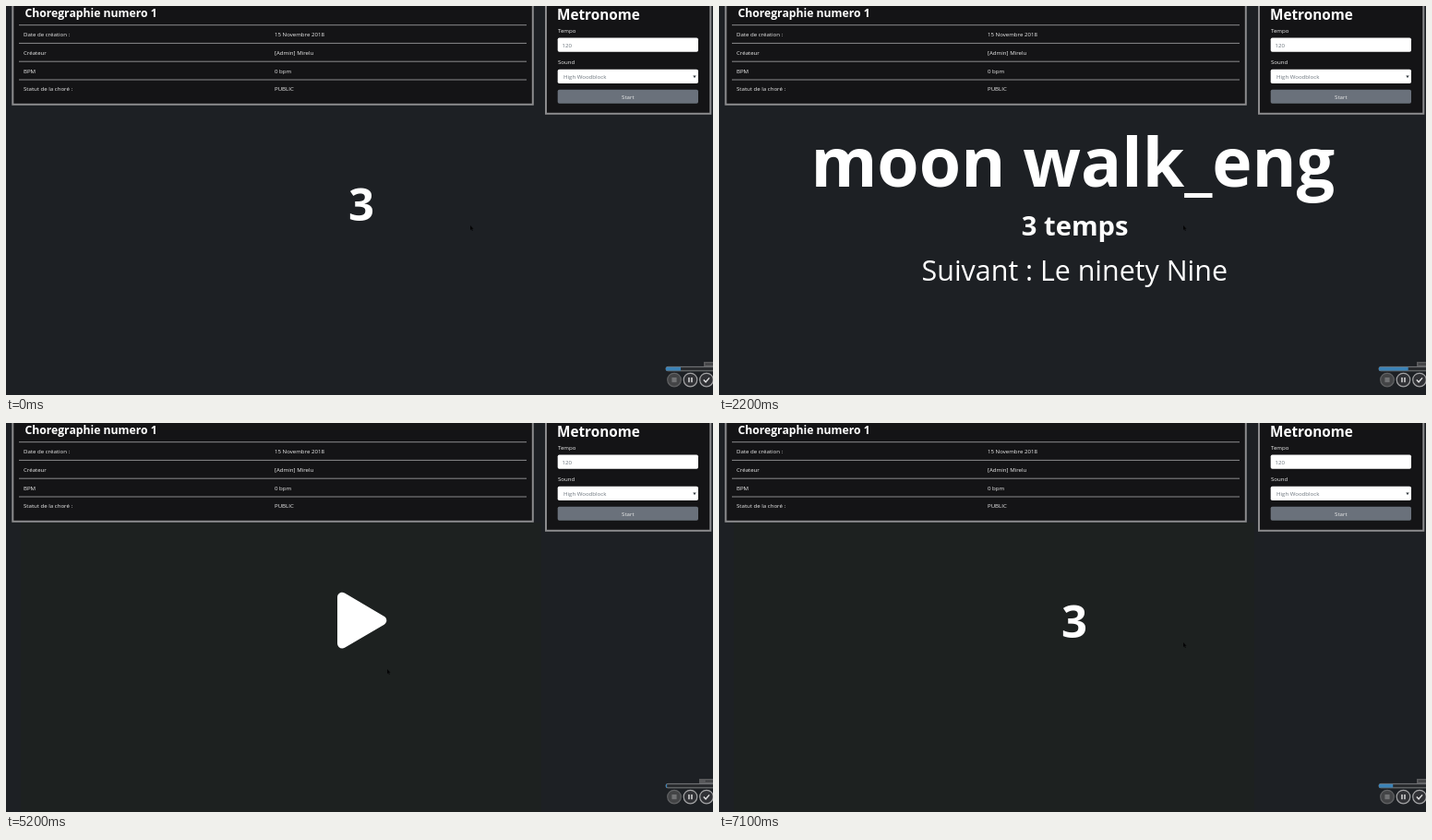
Write an HTML page that moves like this. It is 766 px wide and 422 px high and loops after 7200 ms.

```html
<!DOCTYPE html>
<html lang="fr">
<head>
<meta charset="utf-8">
<title>Choregraphie</title>
<style>
  html, body { margin: 0; width: 100%; height: 100%; overflow: hidden; background: #1d2024; }
  svg { display: block; width: 100vw; height: 100vh; }
  text { font-family: "Open Sans", "Noto Sans", sans-serif; fill: #fff; }
  .small { font-size: 6.1px; }
  .small text { fill: #eee; }
  .small .field { fill: #6c757d; }
  .bold { font-weight: 700; }
  .mid { text-anchor: middle; }
  .count { font-size: 49px; }
  .panel { fill: #141416; stroke: #8b8b8d; stroke-width: 2; }
  .rule { stroke: #8b8b8d; stroke-width: 1; }

  /* Every animation shares one 7.2 s loop. */
  .cue, .hand, .arrow, .bar { animation: 7.2s step-end infinite; }
  .three { animation-name: three; }
  .two   { animation-name: two; }
  .one   { animation-name: one; }
  .move  { animation-name: move; }
  .play  { animation-name: play; }
  .tint  { animation-name: tint; }
  .wide  { animation-name: wide; }
  .hand  { animation-name: hand; }
  .icon  { animation: hover 7.2s step-end infinite; }
  .arrow { animation-name: glide; animation-timing-function: ease-in-out; }
  .bar   { animation-name: fill; animation-timing-function: linear; transform-origin: 715px 0; }

  @keyframes three { 0% { opacity: 1 } 1.389% { opacity: 0 } 87.5%, 100% { opacity: 1 } }
  @keyframes two   { 0% { opacity: 0 } 1.389% { opacity: 1 } 15.278%, 100% { opacity: 0 } }
  @keyframes one   { 0% { opacity: 0 } 15.278% { opacity: 1 } 29.167%, 100% { opacity: 0 } }
  @keyframes move  { 0% { opacity: 0 } 29.167% { opacity: 1 } 66.667%, 100% { opacity: 0 } }
  @keyframes play  { 0% { opacity: 0 } 66.667% { opacity: 1 } 87.5%, 100% { opacity: 0 } }
  @keyframes tint  { 0% { opacity: 0 } 66.667%, 100% { opacity: 1 } }
  @keyframes wide  { 0% { opacity: 0 } 66.667% { opacity: 1 } 76.389%, 100% { opacity: 0 } }
  @keyframes hand  { 0% { opacity: 0 } 77.778% { opacity: 1 } 87.5%, 100% { opacity: 0 } }
  @keyframes hover { 0% { color: #fff } 77.778%, 100% { color: #9b9b9c } }
  @keyframes fill {
    0% { transform: scaleX(.318) }
    66.66% { transform: scaleX(1) }
    66.667%, 69.444% { transform: scaleX(0) }
    100% { transform: scaleX(.318) }
  }
  @keyframes glide {
    0%, 66.66% { transform: translate(503px, 238px); opacity: 1 }
    66.667% { transform: translate(407px, 243px); opacity: 1 }
    72.222% { transform: translate(413px, 267px); opacity: 1 }
    77.77% { transform: translate(385px, 216px); opacity: 1 }
    77.778%, 87.49% { transform: translate(385px, 216px); opacity: 0 }
    87.5% { transform: translate(385px, 216px); opacity: 1 }
    95.833%, 100% { transform: translate(503px, 238px); opacity: 1 }
  }
</style>
</head>
<body>
<svg viewBox="0 0 766 422" preserveAspectRatio="none">
  <rect width="766" height="422" fill="#1d2024"/>
  <rect class="cue tint" x="16" y="108" width="564" height="314" fill="#1d2120"/>

  <!-- Dance details -->
  <rect class="panel" x="7.3" y="-10" width="563.5" height="116.8"/>
  <path class="rule" d="M14 20.7H564M14 40.4H564M14 60.2H564M14 80H564"/>
  <text class="bold" x="20.4" y="12" font-size="12.2">Choregraphie numero 1</text>
  <g class="small">
    <text x="19" y="33">Date de création :</text><text x="291" y="33">15 Novembre 2018</text>
    <text x="19" y="52.7">Créateur</text><text x="291" y="52.7">[Admin] Mirelu</text>
    <text x="19" y="72.5">BPM</text><text x="291" y="72.5">0 bpm</text>
    <text x="19" y="92.2">Statut de la choré :</text><text x="291" y="92.2">PUBLIC</text>
  </g>

  <!-- Metronome -->
  <rect class="panel" x="585" y="-10" width="178.3" height="126.8"/>
  <text class="bold" x="597" y="15.3" font-size="15.3">Metronome</text>
  <g class="small">
    <text x="598" y="28.6">Tempo</text>
    <rect x="597.7" y="34.5" width="152.3" height="15.3" rx="1.8" fill="#fff"/>
    <text class="field" x="602.5" y="44.8">120</text>
    <text x="598" y="63.2">Sound</text>
    <rect x="597.7" y="68.8" width="152.3" height="15.3" rx="1.8" fill="#fff"/>
    <text class="field" x="604" y="79">High Woodblock</text>
    <path d="M744.3 75.6h3.4l-1.7 2.6z" fill="#343a40"/>
    <rect x="597.7" y="90.8" width="152.3" height="15" rx="1.8" fill="#6a717b"/>
    <text class="mid" x="673.8" y="100.6">Start</text>
  </g>

  <!-- Countdown and current step -->
  <g class="bold mid count">
    <text class="cue three" x="385" y="233">3</text>
    <text class="cue two" x="385" y="233">2</text>
    <text class="cue one" x="386" y="233">1</text>
  </g>
  <g class="cue move mid">
    <text class="bold" x="383.3" y="196" font-size="73.3">moon walk_eng</text>
    <text class="bold" x="385.7" y="249" font-size="29.2">3 temps</text>
    <text x="385.3" y="297.5" font-size="30.4">Suivant : Le ninety Nine</text>
  </g>
  <g class="cue play">
    <path class="icon" d="M364.3 189V239.3L407 214.2Z" fill="currentColor" stroke="currentColor"
      stroke-width="10.6" stroke-linejoin="round"/>
  </g>

  <!-- Pointers -->
  <path class="arrow" d="M0 0V5L1.2 4L2 6L2.8 5.6L2 3.7H3.5Z" fill="#050506"/>
  <path class="hand" d="M384.6 215.6q.9-.7 1.5.3v2.3l3 .7q.9.4.7 1.6l-.7 3.4h-3.6l-2.7-3.2q.2-1.2 1.8-.1z"
    fill="#fff" stroke="#222" stroke-width=".6"/>

  <!-- Recorder controls -->
  <rect class="cue wide" x="751" y="386" width="6" height="5" fill="#58595b"/>
  <rect x="756" y="386" width="10" height="5" fill="#58595b"/>
  <path d="M758 388.5h8" stroke="#2c2d30" stroke-width="1.6" stroke-dasharray="1.4 .7"/>
  <rect x="715" y="391.4" width="56" height="4.4" rx="2" fill="#292b2e" stroke="#858688" stroke-width=".9"/>
  <rect class="bar" x="715" y="391.8" width="51" height="3.6" rx="1" fill="#3b83b8"/>
  <g fill="#303135" stroke="#a5a5a7" stroke-width="1.2">
    <circle cx="724" cy="405.6" r="7.3" fill="#434446" stroke="#626365"/>
    <circle cx="741.5" cy="405.6" r="7.3"/>
    <circle cx="759" cy="405.6" r="7.3"/>
  </g>
  <rect x="721.4" y="403" width="5.2" height="5.2" fill="#707173"/>
  <path d="M740 403v5.2M743 403v5.2M755.8 405.6l2.3 2.4 4-4.6" fill="none" stroke="#e4e4e5" stroke-width="1.4"/>
</svg>
</body>
</html>
```
